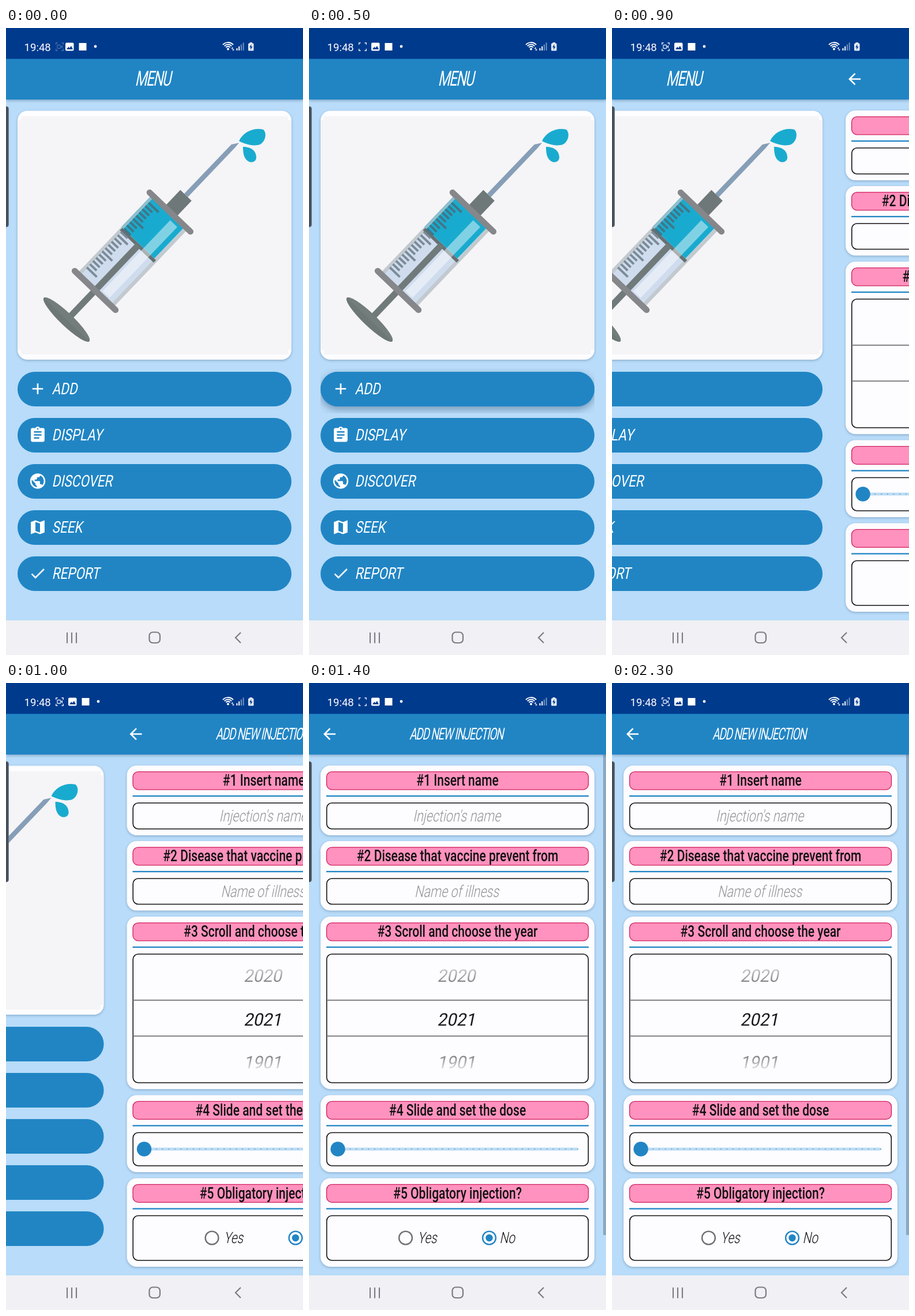
Animation of 515x1087 px, one loop 2.4 s. Source, as an HTML page with a canvas:

```html
<!DOCTYPE html>
<html lang="en">
<head>
<meta charset="utf-8">
<title>Injection menu</title>
<style>
html, body { margin: 0; width: 100%; height: 100%; overflow: hidden; background: #b8dcf9; }
canvas { display: block; width: 515px; height: 1087px; }
</style>
</head>
<body>
<canvas id="stage" width="515" height="1087"></canvas>
<script>
const ctx = document.getElementById('stage').getContext('2d');
const W = 515, H = 1087, LOOP = 2400, STEP = 100;
const BLUE = '#2185c4', SKY = '#b8dcf9', CARD = '#fdfcff', TEAL = '#19abcf';

// One condensed face per role: weight, width, slant and tracking in em.
const FACES = {
  title: { weight: 400, width: .66, slant: .2, track: -.06 },
  button: { weight: 400, width: .8, slant: .2, track: 0 },
  label: { weight: 300, width: .77, slant: .2, track: 0 },
  heading: { weight: 500, width: .75, slant: 0, track: 0 },
  year: { weight: 400, width: .98, slant: .2, track: 0 },
  clock: { weight: 400, width: 1, slant: 0, track: 0 }
};

const ICONS = {
  add: 'M19 13h-6v6h-2v-6H5v-2h6V5h2v6h6v2z',
  clipboard: 'M19 3h-4.18C14.4 1.84 13.3 1 12 1c-1.3 0-2.4.84-2.82 2H5c-1.1 0-2 .9-2 2v14c0 1.1.9 2 2 2h14c1.1 0 2-.9 2-2V5c0-1.1-.9-2-2-2zm-7 0c.55 0 1 .45 1 1s-.45 1-1 1-1-.45-1-1 .45-1 1-1zm2 14H7v-2h7v2zm3-4H7v-2h10v2zm0-4H7V7h10v2z',
  globe: 'M12 2C6.48 2 2 6.48 2 12s4.48 10 10 10 10-4.48 10-10S17.52 2 12 2zm-1 17.93c-3.95-.49-7-3.85-7-7.93 0-.62.08-1.21.21-1.79L9 15v1c0 1.1.9 2 2 2v1.93zm6.9-2.54c-.26-.81-1-1.39-1.9-1.39h-1v-3c0-.55-.45-1-1-1H8v-2h2c.55 0 1-.45 1-1V7h2c1.1 0 2-.9 2-2v-.41c2.93 1.19 5 4.06 5 7.41 0 2.08-.8 3.97-2.1 5.39z',
  map: 'M20.5 3l-.16.03L15 5.1 9 3 3.36 4.9c-.21.07-.36.25-.36.48V20.5c0 .28.22.5.5.5l.16-.03L9 18.9l6 2.1 5.64-1.9c.21-.07.36-.25.36-.48V3.5c0-.28-.22-.5-.5-.5zM15 19l-6-2.11V5l6 2.11V19z',
  check: 'M9 16.17L4.83 12l-1.42 1.41L9 19 21 7l-1.41-1.41z',
  back: 'M20 11H7.83l5.59-5.59L12 4l-8 8 8 8 1.41-1.41L7.83 13H20v-2z'
};

const MENU = [['add', 'ADD'], ['clipboard', 'DISPLAY'], ['globe', 'DISCOVER'], ['map', 'SEEK'], ['check', 'REPORT']];
const FORM = [
  [143, 121, '#1 Insert name'],
  [274, 120.5, '#2 Disease that vaccine prevent from'],
  [405, 299, '#3 Scroll and choose the year'],
  [714.5, 133.5, '#4 Slide and set the dose'],
  [858.5, 153.5, '#5 Obligatory injection?']
];

const clamp = v => Math.max(0, Math.min(1, v));

function scoped(draw) {
  ctx.save();
  draw();
  ctx.restore();
}

function rect(x, y, w, h, fill) {
  ctx.fillStyle = fill;
  ctx.fillRect(x, y, w, h);
}

function round(x, y, w, h, r, fill, stroke, line) {
  ctx.beginPath();
  ctx.roundRect(x, y, w, h, r);
  if (fill) { ctx.fillStyle = fill; ctx.fill(); }
  if (stroke) { ctx.strokeStyle = stroke; ctx.lineWidth = line; ctx.stroke(); }
}

function circle(x, y, r, fill, stroke, line) {
  round(x - r, y - r, 2 * r, 2 * r, r, fill, stroke, line);
}

function poly(points, fill) {
  ctx.beginPath();
  points.forEach(([x, y]) => ctx.lineTo(x, y));
  ctx.fillStyle = fill;
  ctx.fill();
}

function lines(list, color, width, cap = 'butt') {
  ctx.beginPath();
  for (const [x1, y1, x2, y2] of list) { ctx.moveTo(x1, y1); ctx.lineTo(x2, y2); }
  ctx.strokeStyle = color;
  ctx.lineWidth = width;
  ctx.lineCap = cap;
  ctx.stroke();
}

function shadow(alpha, blur, dy) {
  ctx.shadowColor = `rgba(30,60,100,${alpha})`;
  ctx.shadowBlur = blur;
  ctx.shadowOffsetY = dy;
}

function text(str, x, y, face, size, color, align = 'center') {
  const f = FACES[face];
  scoped(() => {
    const lean = align === 'center' ? f.slant * size * .35 : 0;
    ctx.transform(f.width, 0, -f.slant, 1, x - lean, y);
    ctx.font = `${f.weight} ${size}px Roboto, sans-serif`;
    ctx.letterSpacing = f.track * size + 'px';
    ctx.textAlign = align;
    ctx.fillStyle = color;
    ctx.fillText(str, 0, 0);
  });
}

function icon(name, x, y) {
  scoped(() => {
    ctx.translate(x, y);
    ctx.scale(1.32, 1.32);
    ctx.translate(-12, -12);
    ctx.fillStyle = '#fff';
    ctx.fill(new Path2D(ICONS[name]));
  });
}

function fade(y1, a1, y2, a2) {
  const g = ctx.createLinearGradient(0, y1, 0, y2);
  g.addColorStop(0, `rgba(25,25,30,${a1})`);
  g.addColorStop(1, `rgba(25,25,30,${a2})`);
  return g;
}

function syringe() {
  scoped(() => {
    // Local x runs from the lower flange towards the needle.
    ctx.transform(.691, -.723, .723, .691, 154.5, 455);
    rect(0, -43, 188, 86, '#c2cacf');
    rect(0, -36.5, 188, 73, '#cfdcee');
    rect(111, -43, 77, 79, TEAL);
    rect(111, -43, 77, 5, '#8fbfcd');
    rect(105, -41, 6, 81, '#667073');
    rect(-66, -5.5, 174, 11, '#707a7a');
    for (let i = 0; i <= 20; i++) {
      const x = 19 + i * 7.75;
      rect(x - 2, -38, 4, i % 5 ? 16 : 24, x > 108 ? '#417688' : '#7b8b97');
    }
    rect(8, 10, 170, 17, 'rgba(255,255,255,.45)');
    rect(188, -13.5, 40, 27, '#6e7879');
    poly([[228, -4.3], [346, -4], [357.5, 3.5], [346, 4.3], [228, 4.3]], '#869eb7');
    lines([[0, -49, 0, 49], [188, -49, 188, 49]], '#85878a', 10.5, 'round');
    ctx.beginPath();
    ctx.ellipse(-70.7, -.9, 11, 54.5, 0, 0, Math.PI * 2);
    ctx.fillStyle = '#6c7776';
    ctx.fill();
    ctx.beginPath();
    ctx.ellipse(-70.7, -.9, 11, 54.5, 0, -Math.PI / 2, Math.PI / 2);
    ctx.fillStyle = '#727d7c';
    ctx.fill();
  });
  ctx.fillStyle = TEAL;
  ctx.fill(new Path2D('M404 196C411 180 430 172 446 176C453 182 450 197 440 202C428 206 414 201 404 196z'));
  ctx.fill(new Path2D('M411 206C424 206 434 212 434 225C433 233 425 234 420 231C412 226 411 216 411 206z'));
}

function menuPage(lift) {
  scoped(() => {
    shadow(.3, 4, 1.5);
    round(20, 143.5, 475, 431.5, 17, CARD);
  });
  rect(20, 160, 475, 398, '#f5f4f7');
  rect(26, 153, 463, 413, '#f5f4f7');
  syringe();
  MENU.forEach(([name, label], i) => {
    const y = 596 + i * 80;
    if (i === 0 && lift > 0) scoped(() => {
      ctx.beginPath();
      ctx.rect(20, 590, 475, 78);
      ctx.clip();
      shadow(.45 * lift, 14 * lift, 5 * lift);
      round(20, y, 475, 60, 30, BLUE);
    });
    round(20, y, 475, 60, 30, BLUE);
    icon(name, 55, y + 29.5);
    text(label, 79.5, y + 39, 'button', 28, '#fff', 'left');
  });
}

function formPage() {
  for (const [y, h, title] of FORM) {
    scoped(() => {
      shadow(.3, 4, 1.5);
      round(20, y, 475, h, 17, CARD);
    });
    round(30.5, y + 10.8, 454, 31, 9, '#ff92be', '#d01c5b', 1.3);
    text(title, 257.5, y + 35, 'heading', 28, '#111');
    rect(30, y + 51.8, 455, 2.3, BLUE);
    round(30.7, y + 65, 453.6, h - 76, 9, null, '#111', 1.6);
  }
  text("Injection's name", 258, 240, 'label', 28, '#949494');
  text('Name of illness', 258, 371, 'label', 28, '#949494');

  rect(31, 548.8, 453, 2.2, '#8a8a8d');
  rect(31, 611, 453, 2.2, '#8a8a8d');
  text('2020', 257.5, 518, 'year', 30, fade(-24, .2, 2, .55));
  text('2021', 257.5, 593.5, 'year', 30, '#18181b');
  text('1901', 257.5, 668, 'year', 30, fade(-22, .55, 2, .12));

  round(50, 805.5, 417, 5, 2.5, '#bcdcf3');
  for (let i = 2; i < 40; i++) circle(50 + i * 416 / 39, 808, 1.1, '#6ba6d0');
  circle(50, 808, 12.7, BLUE);

  circle(167.5, 962, 11.4, null, '#707074', 2.4);
  text('Yes', 188.5, 971, 'label', 27, '#111', 'left');
  circle(312.5, 962, 11.4, null, BLUE, 2.4);
  circle(312.5, 962, 6.2, BLUE);
  text('No', 330.5, 971, 'label', 27, '#111', 'left');
  rect(510, 124, 5, 833, '#8ba9c0');
}

function recorder(alpha, camera) {
  scoped(() => {
    ctx.globalAlpha = alpha;
    const corners = [];
    for (const sx of [-1, 1]) for (const sy of [-1, 1]) {
      const x = 93 + sx * 6.3, y = 32.5 + sy * 6.8;
      corners.push([x + sx * .7, y, x - sx * 3, y], [x, y, x, y - sy * 3.3]);
    }
    lines(corners, '#dfe8f5', 1.4);
    if (camera) {
      round(89, 29.5, 5.5, 6, 1, null, '#dfe8f5', 1.3);
      poly([[95, 32.5], [98, 29.5], [98, 35.5]], '#dfe8f5');
    }
  });
}

function statusBar(intro, camera) {
  rect(0, 0, W, 53.5, '#003a8d');
  text('19:48', 31.5, 39.5, 'clock', 18.6, '#fff', 'left');
  recorder(.3 + .7 * intro, camera);
  const dx = (intro - 1) * 5;
  scoped(() => {
    ctx.translate(dx, 0);
    round(108, 25.5, 14.5, 14, 2, '#fff');
    poly([[110, 37], [113.3, 32.5], [115.3, 34.8], [118, 31], [121, 37]], '#003a8d');
    rect(131.5, 26, 13, 13, '#fff');
    circle(160, 32, 2.4, '#fff');
  });

  // Wi-Fi, signal and battery
  ctx.strokeStyle = '#fff';
  ctx.lineWidth = 1.8;
  for (const r of [5, 8.5, 12]) {
    ctx.beginPath();
    ctx.arc(385, 37, r, -Math.PI * .77, -Math.PI * .23);
    ctx.stroke();
  }
  circle(385, 36.5, 2, '#fff');
  poly([[390.5, 36], [394.5, 36], [392.5, 33.2]], '#fff');
  poly([[392, 37], [396, 37], [394, 39.5]], '#fff');
  for (let i = 0; i < 4; i++) {
    const h = 4 + i * 3.2;
    rect(399.5 + i * 3.7, 39 - h, 2, h, i < 2 ? '#fff' : 'rgba(255,255,255,.45)');
  }
  round(420, 26.5, 9.5, 13, 1.5, '#e6edf7');
  rect(422.5, 25, 4.5, 2, '#e6edf7');
  poly([[425.5, 28], [422, 33.5], [424.4, 33.5], [423.8, 38], [427.6, 32.3], [425.2, 32.3]], '#003a8d');
}

function navBar() {
  rect(0, 1027, W, 60, '#f1f0f4');
  lines([106, 114, 122].map(x => [x, 1048, x, 1066.5]), '#7b7b81', 2.1);
  round(248.5, 1047.5, 18.5, 18.5, 6, null, '#7b7b81', 2.2);
  ctx.beginPath();
  ctx.moveTo(407, 1048);
  ctx.lineTo(398, 1057);
  ctx.lineTo(407, 1066);
  ctx.lineWidth = 2.2;
  ctx.stroke();
}

function shifted(dx, draw) {
  scoped(() => {
    ctx.translate(dx, 0);
    draw();
  });
}

function render(time) {
  const t = Math.floor((time % LOOP) / STEP) * STEP;
  // Accelerate-decelerate page slide over 400 ms.
  const slide = W * (1 - Math.cos(Math.PI * clamp((t - 766) / 400))) / 2;
  const lift = Math.min(clamp((t - 300) / 200), clamp((800 - t) / 200));
  const intro = 1 - (1 - clamp(t / 200)) ** 2;
  const camera = t < 400 || (t - 400) % 1000 >= 500;

  rect(0, 0, W, H, SKY);
  if (slide < W) shifted(-slide, () => menuPage(lift));
  if (slide > 0) shifted(W - slide, formPage);

  scoped(() => {
    shadow(.4, 5, 1.5);
    rect(0, 53, W, 71, BLUE);
  });
  if (slide < W) shifted(-slide, () => text('MENU', 256.5, 100, 'title', 36, '#fff'));
  if (slide > 0) shifted(W - slide, () => {
    icon('back', 35.5, 88.5);
    text('ADD NEW INJECTION', 257, 98, 'title', 28.5, '#fff');
  });
  statusBar(intro, camera);
  navBar();
  round(-6, 136, 10.5, 209, 4, '#46505b', 'rgba(110,125,140,.6)', 1);
}

const start = performance.now();
function tick() {
  render(performance.now() - start);
  requestAnimationFrame(tick);
}
tick();
</script>
</body>
</html>
```
